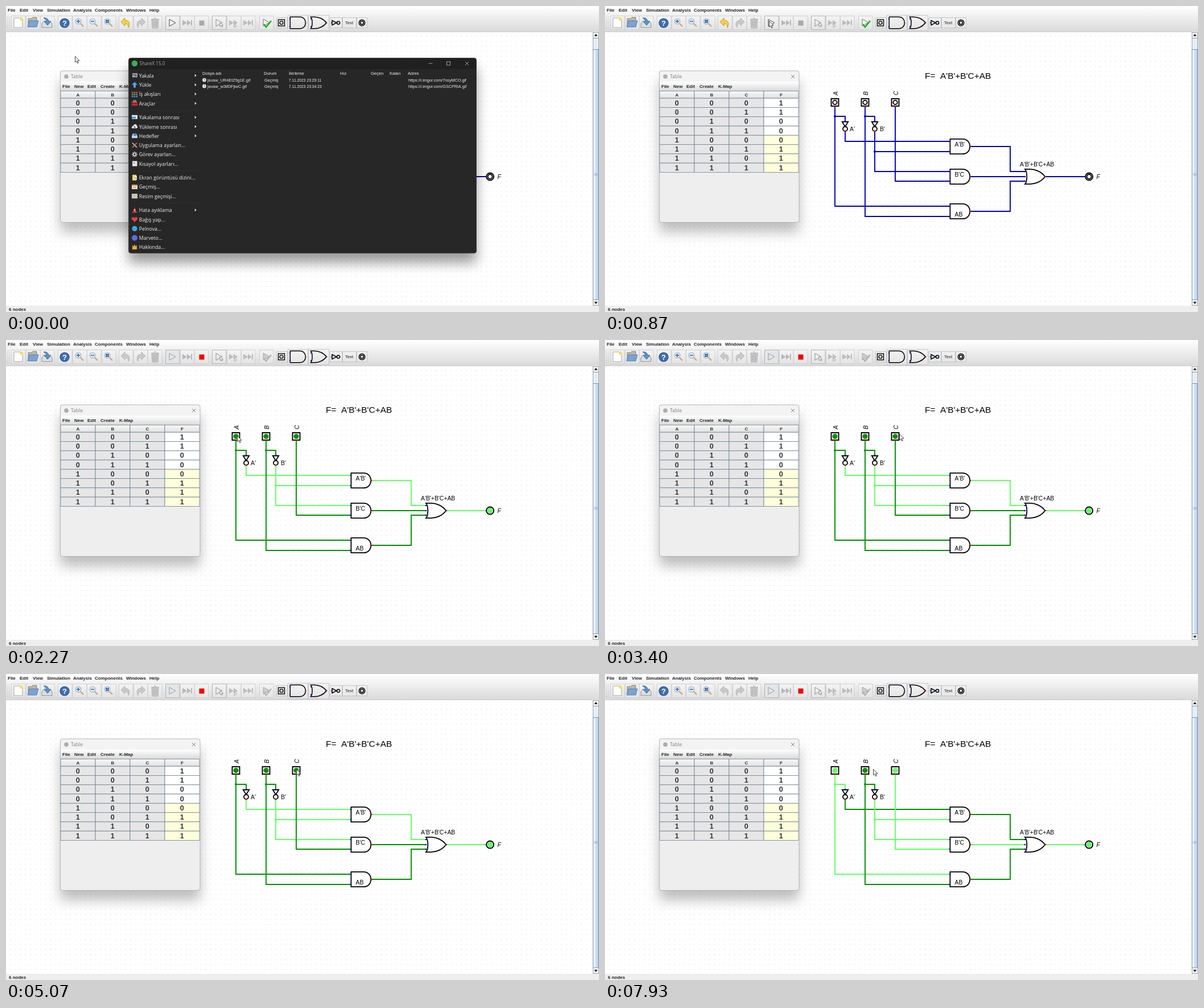
Animation of 1042x538 px, one loop 8000 ms. Source, as an HTML page with a canvas:

```html
<!DOCTYPE html>
<html lang="en">
<head>
<meta charset="utf-8">
<title>Circuit simulation</title>
<style>
html, body { margin: 0; width: 100%; height: 100%; overflow: hidden; background: #fff; }
canvas { display: block; }
</style>
</head>
<body>
<canvas id="stage" width="1042" height="538"></canvas>
<script>
const W = 1042, H = 538, LOOP = 8000;
const ARIAL = '"Liberation Sans", Arial, sans-serif';
const UI = '"Open Sans", "Noto Sans", sans-serif';
const BLUE = '#0000b2', HIGH = '#66ff66', LOW = '#008e00', GRID = '#7a8a99';
const screen = document.getElementById('stage').getContext('2d');
let c = screen;

// ---------- helpers ----------
function rect(x, y, w, h, fill, stroke, lw = 1) {
  if (fill) { c.fillStyle = fill; c.fillRect(x, y, w, h); }
  if (stroke) { c.strokeStyle = stroke; c.lineWidth = lw; c.strokeRect(x, y, w, h); }
}
function paint(path, fill, stroke, lw = 1) {
  if (fill) { c.fillStyle = fill; c.fill(path); }
  if (stroke) { c.strokeStyle = stroke; c.lineWidth = lw; c.stroke(path); }
}
function circle(x, y, r, fill, stroke, lw) {
  const p = new Path2D();
  p.arc(x, y, r, 0, 7);
  paint(p, fill, stroke, lw);
}
function shape(x, y, d, fill, stroke, lw = 1, scale = 1) {
  c.save();
  c.translate(x, y);
  c.scale(scale, scale);
  paint(new Path2D(d), fill, stroke, lw / scale);
  c.restore();
}
function text(s, x, y, font, color = '#222', align = 'left') {
  c.font = font;
  c.fillStyle = color;
  c.textAlign = align;
  c.fillText(s, x, y);
}
function fade(y0, y1, a, b, x0 = 0, x1 = 0) {
  const g = c.createLinearGradient(x0, y0, x1, y1);
  g.addColorStop(0, a);
  g.addColorStop(1, b);
  return g;
}
function panel(x, y, w, h, fill, alpha) {
  const p = new Path2D();
  p.roundRect(x, y, w, h, 4);
  c.save();
  c.shadowColor = `rgba(0,0,0,${alpha})`;
  c.shadowBlur = 22;
  c.shadowOffsetY = 17;
  paint(p, fill);
  c.restore();
  return p;
}

// ---------- main window ----------
const AND = 'M.4-13.2H22C39.6-13.2 39.6 13.2 22 13.2H.4Z';
const OR = 'M0-13.2H8.8C17.6-13.2 29-8.8 35.2 0C29 8.8 17.6 13.2 8.8 13.2H0C4.4 8.8 4.4-8.8 0-13.2Z';
const PLAY = 'M-5-6L6 0L-5 6Z';
const BOLD = 'bold 8px ' + ARIAL;

function magnifier(x, mark) {
  shape(x, 29, 'M2 2L7 7', null, '#c9a873', 2.4);
  circle(x - 2, 27, 5, '#dbe8f5', '#a3b2c1', 1.1);
  shape(x - 2, 27, mark, null, '#2f5f9e', 1.4);
}

function toolbar(pressed, on) {
  for (let y = 18; y < 42; y += 3) for (let x = 2; x < 7; x += 3) rect(x, y, 1, 1, '#b3b8bd');
  for (const x of [9, 35, 60, 91, 117, 142, 168, 198, 224, 249, 280, 306, 331, 362, 388, 413, 445]) {
    const strong = x === 280 || x === 362;
    rect(x + .5, 17.5, 24.5, 24, x === 280 && pressed ? '#e4e5e6' : 'rgba(255,255,255,.2)',
      strong ? '#b0b4b8' : '#cdd0d4');
  }
  // files
  shape(21, 29, 'M-7-8H4L8-4V9H-7Z', '#fdfdfd', '#a8a8a8');
  circle(27, 23, 2.8, '#f4e04d');
  shape(47, 29, 'M-8-7H-2L0-9H7V7H-8Z', '#c0b8a6', '#8a8374');
  shape(47, 29, 'M-6-3H10L7 8H-9Z', '#7aa3d3', '#5a80ad');
  shape(72, 29, 'M-9 2L-6-2H6L9 2V9H-9Z', '#dcdfe1', '#8a8a8a');
  shape(72, 29, 'M-6-8C1-9 3-4 3-2H7L1 5L-5-2H-1C-1-4-3-6-6-8Z', '#5f91c4', '#44709f');
  // help and zoom
  circle(103, 30, 8, '#3f6fb0', '#274d86', 1.2);
  text('?', 103, 34.5, 'bold 13px ' + ARIAL, '#fff', 'center');
  magnifier(129, 'M-3 0H3M0-3V3');
  magnifier(154, 'M-3 0H3');
  magnifier(180, 'M-3-1.5H3M-3 1.5H3M-1.5-3V3M1.5-3V3');
  // edit
  const bend = 'M-8-2L-1-9V-5C6-5 9 0 5 8C5 3 3 1-1 1V5Z';
  shape(210, 30, bend, on ? '#c9c9c9' : '#f1d24b', on ? '#b8b8b8' : '#c39b1c');
  c.save();
  c.translate(474, 0);
  c.scale(-1, 1);
  shape(237, 30, bend, '#c9c9c9', '#b8b8b8');
  c.restore();
  shape(262, 30, 'M-6-6H6L5 9H-5Z', '#c6c6c6', '#b0b0b0');
  shape(262, 30, 'M-7-7H7M-2-9H2M-2-3V6M2-3V6', null, '#aaa');
  // simulation
  shape(292, 29.5, PLAY, on ? null : '#f7f7f7', on ? '#999' : '#444');
  const skip = 'M-8-5L0 0L-8 5ZM0-5L7 0L0 5Z';
  shape(318, 29.5, skip + 'M7-5H9V5H7Z', '#b9b9b9');
  rect(339.5, 25.5, 9, 9, on ? '#f00000' : '#a9a9a9');
  shape(374, 29.5, PLAY, null, '#888', .9);
  shape(376, 30, 'M0-1V6L1.8 4.4L3.4 7L4.4 6.4L3.2 3.8H5.4Z', '#fff', '#777', .8);
  shape(400, 29.5, skip, '#bdbdbd');
  shape(401, 31, 'M0 0V7L5 4Z', '#ddd', '#aaa', .8);
  shape(425, 29.5, skip + 'M7-5H9V5H7Z', '#bdbdbd');
  shape(457, 29, PLAY, on ? '#ccc' : '#f2f2f2', on ? '#aaa' : '#777');
  shape(458, 31, 'M-5 1L-1 6L8-5', null, on ? '#b4b4b4' : '#19b31f', 2.6);
  // parts
  for (const [x, w, y, h] of [[475, 19, 20, 18], [495, 35, 16, 27], [531, 36, 16, 27], [569, 21, 20, 18], [591, 24, 20, 18], [616, 18, 20, 18]])
    rect(x + .5, y + .5, w, h, 'rgba(255,255,255,.2)', '#c2c6ca');
  rect(478.5, 24, 11, 11, null, '#000', 1.4);
  circle(484, 29.5, 2.9, null, '#000', 1.4);
  shape(499, 29.5, AND, null, '#000', 1.5, .78);
  shape(535.5, 29.5, OR, null, '#000', 1.5, .78);
  for (const y of [22.6, 36.4]) { circle(499, y, 1.1, BLUE); circle(536, y, 1.1, BLUE); }
  circle(526.5, 29.5, 1.1, '#c00');
  circle(563.5, 29.5, 1.1, '#c00');
  shape(573, 29.5, 'M0-4L8 0L0 4Z', null, '#000', 1.5);
  circle(584, 29.5, 2.6, null, '#000', 1.5);
  circle(572, 29.5, 1, BLUE);
  text('Text', 603, 32.3, '8px ' + ARIAL, '#222', 'center');
  circle(625.5, 29.5, 5.2, null, '#000', 1.5);
  circle(625.5, 29.5, 2.9, null, '#000', 1.5);
}

function frameWindow(pressed, on) {
  rect(0, 0, W, H, '#fff');
  for (let x = 8; x < 1030; x += 8.8)
    for (let y = 53.2; y < 527; y += 8.8) rect(x - .5, y - .5, 1, 1, '#cfcfcf');
  rect(0, 0, W, 45, fade(0, 45, '#ffffff', '#dadada'));
  rect(0, 45, W, 1, '#cbcbcb');
  const menu = { File: 3, Edit: 24, View: 47, Simulation: 72, Analysis: 118, Components: 156, Windows: 211, Help: 252 };
  for (const name in menu) text(name, menu[name], 10, BOLD);
  toolbar(pressed, on);
  rect(0, 527, W, 11, '#eeeeee');
  text('6 nodes', 5, 536, BOLD);
  // scroll bar
  rect(1031, 45, 11, 482, '#eeeeee');
  rect(1031.5, 46.5, 10, 10, '#f2f2f2', GRID, .7);
  rect(1031.5, 56.5, 10, 460, '#e6edf5', GRID, .7);
  rect(1031.5, 76.5, 10, 440, fade(0, 0, '#ffffff', '#b8cfe5', 1031, 1040), '#6382bf', .8);
  rect(1031.5, 516.5, 10, 10, '#f2f2f2', GRID, .7);
  shape(1036.5, 51, 'M-3 2H3L0-2Z', '#222');
  shape(1036.5, 522, 'M-3-2H3L0 2Z', '#222');
  shape(1036.5, 296, 'M-3-1.5H3M-3 0H3M-3 1.5H3', null, '#8ba6cd', .7);
}

// ---------- truth table ----------
function tableWindow() {
  const p = panel(95.5, 114, 245.5, 266.5, '#f3f3f3', .26);
  circle(106, 124, 3.8, '#a9aeab');
  text('Table', 114, 127, '8.6px ' + UI, '#808080');
  shape(330, 124, 'M-3-3L3 3M3-3L-3 3', null, '#777', .9);
  rect(96, 133, 244.5, 16, fade(133, 149, '#ffffff', '#dadada'));
  const menu = { File: 99, New: 120, Edit: 143, Create: 166, 'K-Map': 199 };
  for (const name in menu) text(name, menu[name], 144, BOLD);
  rect(96, 149, 244.5, 231, '#eeeeee');
  for (let i = 0; i < 4; i++) {
    const x = 96 + i * 61;
    rect(x, 149.5, 61, 12.7, fade(149, 162, '#f8f8f8', '#e2e2e2'), GRID, .9);
    text('ABCF'[i], x + 30.5, 159, BOLD, '#333', 'center');
    for (let r = 0; r < 8; r++) {
      const y = 162.2 + r * 16.28;
      const A = r >> 2 & 1, B = r >> 1 & 1, C = r & 1;
      const F = !A && !B || !B && C || A && B ? 1 : 0;
      rect(x, y, 61, 16.28, i < 3 ? '#e6e6e6' : r < 4 ? '#ffffff' : '#ffffdc', GRID, .9);
      text([A, B, C, F][i], x + 30.2, y + 12.6, 'bold 12.6px ' + ARIAL, '#333', 'center');
    }
  }
  paint(p, null, '#a0a5aa', .8);
}

// ---------- circuit (grid units, snapped to whole pixels) ----------
const X = n => Math.round(404 + 8.8 * n), Y = n => Math.round(238 + 8.8 * n);

function circuit(on, A, B, C) {
  const tint = v => !on ? BLUE : v ? HIGH : LOW;
  const wire = (v, ...pts) => {
    c.beginPath();
    for (let i = 0; i < pts.length; i += 2) c.lineTo(X(pts[i]), Y(pts[i + 1]));
    c.strokeStyle = tint(v);
    c.lineWidth = 1.9;
    c.stroke();
  };
  const pin = (x, y, color) => circle(X(x), Y(y), 1.3, color);
  const label = (s, x, y) => text(s, x, y, '10.4px ' + ARIAL, '#000');
  const p = !A && !B, q = !B && C, r = A && B, F = p || q || r;

  wire(A, 0, -7, 0, 13, 23, 13);
  wire(A, 0, -5, 2, -5, 2, -4);
  wire(!A, 2, -2, 2, 0, 23, 0);
  wire(B, 6, -7, 6, 15, 23, 15);
  wire(B, 6, -5, 8, -5, 8, -4);
  wire(!B, 8, -2, 8, 6, 23, 6);
  wire(!B, 8, 2, 23, 2);
  wire(C, 12, -7, 12, 8, 23, 8);
  wire(p, 27, 1, 35, 1, 35, 6, 38, 6);
  wire(q, 27, 7, 38, 7);
  wire(r, 27, 14, 35, 14, 35, 8, 38, 8);
  wire(F, 42, 7, 50, 7);
  circle(X(0), Y(-5), 2.1, tint(A));
  circle(X(6), Y(-5), 2.1, tint(B));
  circle(X(8), Y(2), 2.1, tint(!B));

  [A, B, C].forEach((v, i) => {
    const x = X(i * 6);
    rect(x - 6.5, 163, 13, 13, null, '#000', 1.9);
    if (on) circle(x, 169.5, 4.5, tint(v));
    else circle(x, 169.5, 3.7, null, '#000', 1.8);
    pin(i * 6, -7, '#c00');
    c.save();
    c.translate(x + 5, 157);
    c.rotate(-Math.PI / 2);
    text('ABC'[i], 0, 0, 'italic 10.4px ' + ARIAL, '#000');
    c.restore();
  });
  for (const n of [2, 8]) {
    shape(X(n), 203.5, 'M-5.3 0H5.3L0 8.5Z', null, '#000', 1.8);
    circle(X(n), 216, 4, null, '#000', 1.8);
    pin(n, -4, BLUE);
    pin(n, -2, '#c00');
  }
  for (const n of [1, 7, 14]) {
    shape(X(23), Y(n), AND, null, '#000', 1.8);
    pin(23, n - 1, BLUE);
    pin(23, n + 1, BLUE);
    pin(27, n, '#c00');
  }
  shape(X(38), Y(7), OR, null, '#000', 1.8);
  for (const n of [6, 7, 8]) pin(38, n, BLUE);
  pin(42, 7, '#c00');
  circle(850.6, Y(7), 6.5, null, '#000', 1.9);
  if (on) circle(850.6, Y(7), 4.9, tint(F));
  else circle(850.6, Y(7), 4, null, '#000', 1.9);
  pin(50, 7, BLUE);

  text("F=  A'B'+B'C+AB", 562, 128, '15.4px ' + ARIAL, '#000');
  label("A'", 430, 220);
  label("B'", 483, 220);
  label("A'B'", 614.5, 247);
  label("B'C", 614.5, 300);
  label('AB', 614.5, 370);
  label("A'B'+B'C+AB", 729, 282);
  text('F', 863.5, 303.5, 'italic 10.4px ' + ARIAL, '#000');
}

function tooltip(x) {
  rect(x + .5, 182.5, 261, 51, '#b8cfe5', '#6382bf');
  ['Can be used to interactively manipulate an input signal in a',
   'circuit with the mouse. If a circuit is intended for embedding',
   'in an other circuit, it is used as an input to connect a signal',
   'of the embedding circuit. In this case the input becomes',
   'a pin of the embedded circuit.'
  ].forEach((s, i) => text(s, x + 4, 192 + i * 9.5, '8.6px ' + ARIAL, '#333'));
}

// ---------- dark window ----------
const ICONS = [
  (x, y) => { rect(x - 4, y - 4, 9, 7, '#a9b2b8'); rect(x - 4, y - 2, 6, 1.5, '#48525a'); circle(x + 2, y, 2, '#59646c'); },
  (x, y) => shape(x, y, 'M0-5L5 0H2V5H-2V0H-5Z', '#55a4ea'),
  (x, y) => { for (let i = 0; i < 9; i++) rect(x - 5 + i % 3 * 3.7, y - 4 + (i / 3 | 0) * 3.5, 2.6, 2.6, ['#e44b44', '#3fae54', '#4a8fe0'][i / 3 | 0]); },
  (x, y) => { rect(x - 5, y - 3, 10, 7, '#c9302c'); rect(x - 2, y - 5, 4, 2, null, '#b9b9b9'); rect(x - 5, y, 10, 1, '#5a1412'); },
  (x, y) => { rect(x - 5, y - 4, 10, 7, '#dfe9f2'); rect(x - 5, y - 1, 7, 3, '#3f8fd8'); },
  (x, y) => { shape(x, y, 'M-5 3C-6-1-2-1-2-2C0-6 4-4 4-1C6 0 5 3 4 3Z', '#e6eaee'); shape(x, y, 'M0-1L2 2H-2Z', '#555'); },
  (x, y) => { shape(x, y, 'M-5 4V1L-3-4H3L5 1V4Z', '#c8d5e0'); rect(x - 2, y - 4, 5, 4, '#3d83cf'); },
  (x, y) => { shape(x, y, 'M-4-4L4 4', null, '#c8cdd2', 1.6); shape(x, y, 'M4-4L-4 4', null, '#d8724a', 1.6); },
  (x, y) => { circle(x, y, 2.4, null, '#d4d4d4', 1.6); shape(x, y, 'M0-5V-3M0 3V5M-5 0H-3M3 0H5M-3.4-3.4L-2-2M2 2L3.4 3.4M3.4-3.4L2-2M-2 2L-3.4 3.4', null, '#d4d4d4', 1.4); },
  (x, y) => { rect(x - 4, y - 4.5, 8.5, 9, '#ece9dc'); rect(x - 2.5, y - 2.5, 3, 3, '#8da5b8'); },
  (x, y) => { rect(x - 4, y - 5, 7, 10, '#f0cf6a'); rect(x, y - 3, 4, 7, '#f7ecc4'); rect(x + 1, y, 2, 2, '#4d8fce'); },
  (x, y) => { rect(x - 5, y - 4, 10, 8, '#eee5d0'); rect(x - 5, y - 4, 10, 2, '#e0853d'); rect(x - 3, y, 6, 1.3, '#a08b6a'); },
  (x, y) => { rect(x - 5, y - 4, 10, 8, '#e9e3d5'); for (let i = 0; i < 6; i++) rect(x - 4 + i % 3 * 3, y - 2.5 + (i / 3 | 0) * 3, 2, 2, i % 2 ? '#7aa0c4' : '#c49a62'); },
  (x, y) => { shape(x, y, 'M0-5L3 4H-3Z', '#e0473c'); rect(x - 4, y + 3, 8, 1.5, '#e0473c'); rect(x - 1.5, y - 1, 3, 1.4, '#f4f4f4'); },
  (x, y) => shape(x, y, 'M0 5L-5 0C-6-4-2-6 0-2C2-6 6-4 5 0Z', '#e2413c'),
  (x, y) => circle(x, y, 4.6, '#3ea6e6'),
  (x, y) => circle(x, y, 5, '#5f6fd6'),
  (x, y) => shape(x, y, 'M-4 4V-4L-2-1L0-5L2-1L4-4V4Z', '#e8a93a')
];
const ITEMS = ['Yakala', 'Yükle', 'İş akışları', 'Araçlar', 'Yakalama sonrası', 'Yükleme sonrası', 'Hedefler',
  'Uygulama ayarları...', 'Görev ayarları...', 'Kısayol ayarları...', 'Ekran görüntüsü dizini...', 'Geçmiş...',
  'Resim geçmişi...', 'Hata ayıklama', 'Bağış yap...', 'Pelnova...', 'Marveto...', 'Hakkında...'];

function darkWindow() {
  const p = panel(215.5, 91.5, 611, 343, '#272727', .4);
  c.save();
  c.clip(p);
  rect(215, 91, 612, 20, '#202020');
  c.restore();
  paint(p, null, '#3c3c3c', .8);
  circle(226, 101, 5.2, '#3fae54');
  text('ShareX 15.0', 234.5, 104.3, '8.2px ' + UI, '#a8a8a8');
  shape(746, 101, 'M-3.5 0H3.5', null, '#aaa', .9);
  rect(774.5, 98, 6, 6, null, '#aaa', .9);
  shape(810, 101, 'M-3-3L3 3M3-3L-3 3', null, '#aaa', .9);
  const submenu = [0, 1, 2, 3, 4, 5, 6, 13];
  ITEMS.forEach((s, i) => {
    const gaps = (i > 3) + (i > 9) + (i > 12);
    const y = 122.3 + i * 16.28 + gaps * 8.3;
    ICONS[i](226, y);
    text(s, 233.7, y + 3.5, '8.8px ' + UI, '#f0f0f0');
    if (submenu.includes(i)) shape(333, y, 'M-1.2-2.5L1.6 0L-1.2 2.5Z', '#f0f0f0');
  });
  for (const y of [183.5, 289.5, 346.5]) rect(234, y, 104, .8, '#343434');
  const cell = (s, x, y, size = 7.3) => text(s, x, y, size + 'px ' + ARIAL, '#eeeeee');
  const head = { 'Dosya adı': 345, Durum: 453, 'İlerleme': 497, 'Hız': 587, 'Geçen': 641, Kalan: 674, Adres: 706 };
  for (const s in head) cell(s, head[s], 120.8, 7.5);
  [['javaw_UR4EtZ9g1E.gif', '7.11.2023 23:29:11', '7nsyMCO'],
   ['javaw_w3ifDFjiwC.gif', '7.11.2023 23:34:23', 'GSCPRIA']].forEach(([file, date, id], i) => {
    const y = 132.7 + i * 10.8;
    circle(348.5, y - 2.6, 3.4, '#e6e6e6');
    shape(348.5, y - 2.6, 'M0-2V0H2', null, '#555', .8);
    cell(file, 354, y);
    cell('Geçmiş', 454, y);
    cell(date, 497, y, 6.75);
    cell(`https://i.imgur.com/${id}.gif`, 707, y, 7.2);
  });
}

const overlay = document.createElement('canvas');
overlay.width = W;
overlay.height = H;
c = overlay.getContext('2d');
darkWindow();
c = screen;

function closingWindow(alpha, scale) {
  c.save();
  c.globalAlpha = alpha;
  c.translate(521, 263);
  c.scale(scale, scale);
  c.drawImage(overlay, -521, -263);
  c.restore();
}

// ---------- pointer: time, x, y ----------
const PATH = [
  [0, 121, 88], [200, 122, 87], [270, 126, 85], [400, 160, 70], [600, 236, 40], [800, 286, 27], [870, 288, 26],
  [1070, 290, 26], [1200, 322, 42], [1330, 394, 82], [1470, 450, 107], [1600, 442, 132], [1730, 423, 153],
  [2000, 412, 164], [2270, 406, 168], [3200, 406, 168], [3270, 432, 166], [3330, 488, 164], [3400, 517, 165],
  [3530, 517, 165], [3600, 515, 167], [3730, 510, 167], [5270, 510, 167], [5330, 500, 165], [5530, 430, 156],
  [5670, 394, 161], [5800, 403, 167], [6000, 403, 167], [6130, 416, 168], [6270, 464, 172], [6400, 500, 172],
  [6470, 506, 171], [6600, 507, 171], [6670, 517, 177], [6730, 524, 180], [6800, 524, 180], [7000, 519, 178],
  [7200, 508, 173], [7400, 500, 170], [7530, 499, 169], [7600, 499, 169], [7730, 502, 169], [7800, 502, 169],
  [7870, 488, 168], [7930, 471, 167]
];

function pointer(t) {
  let i = PATH.findIndex(k => k[0] > t);
  if (i < 0) i = PATH.length;
  const a = PATH[i - 1], b = PATH[i] || a;
  const f = a === b ? 0 : (t - a[0]) / (b[0] - a[0]);
  shape(a[1] + (b[1] - a[1]) * f + .5, a[2] + (b[2] - a[2]) * f + .5,
    'M0 0V10.4L2.4 8.2L4.1 12.2L5.8 11.5L4.1 7.6H7.5Z', '#fff', '#333', .9);
}

const stepTime = k => Math.round(k * 20 / 3) * 10;
function stepAt(t) {
  const k = Math.floor((t + 4) * 15 / 1000);
  return stepTime(k) > t ? k - 1 : k;
}

function draw(t) {
  const on = t >= 1000;
  const A = t >= 6000, B = false, C = t >= 3800 && t < 5070 || t >= 6530;
  frameWindow(t >= 930, on);
  circuit(on, A, B, C);
  tableWindow();
  if (t < 70) closingWindow(1, 1);
  else if (t < 130) closingWindow(.65, .975);
  else if (t < 200) closingWindow(.2, .93);
  if (t >= 3000 && t < 3270) tooltip(406);
  if (t >= 3600 && t < 3800) tooltip(515);
  pointer(t);
}

let shown = -1;
function tick() {
  const k = stepAt(performance.now() % LOOP);
  if (k !== shown) {
    shown = k;
    draw(stepTime(k));
  }
  requestAnimationFrame(tick);
}
tick();
</script>
</body>
</html>
```
